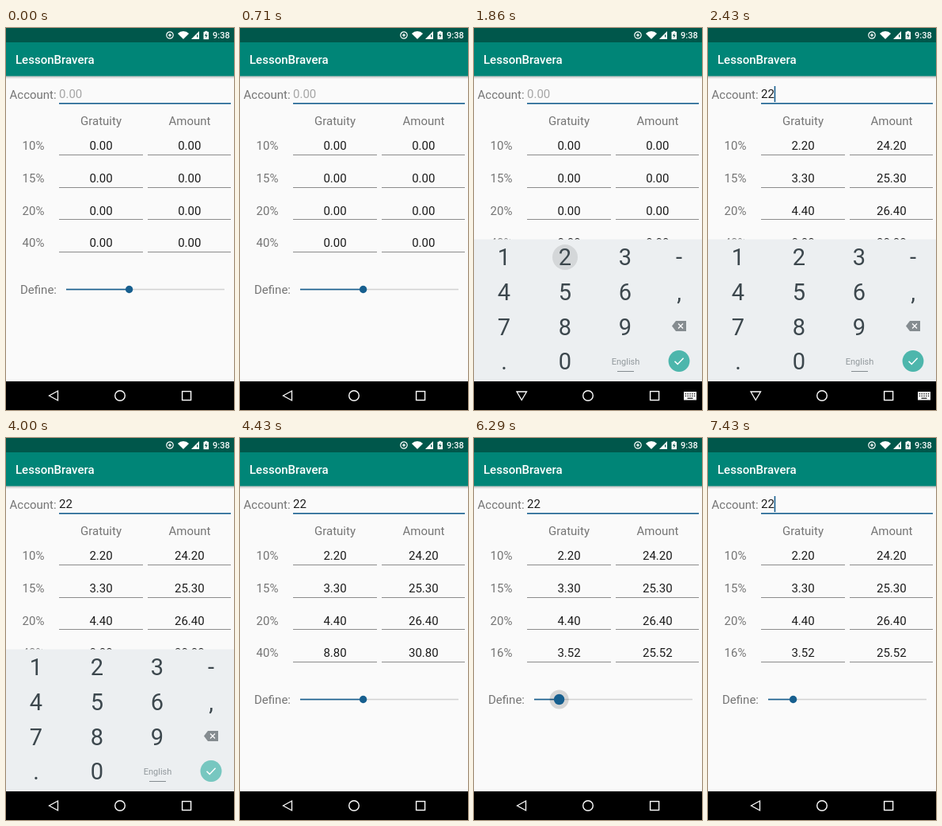
An HTML page with a canvas that plays this animation: 288 by 480 pixels, repeating every 7570 ms.

```html
<!DOCTYPE html>
<html lang="en">
<head>
<meta charset="utf-8">
<title>Tip calculator</title>
<style>
  html, body { margin: 0; width: 100%; height: 100%; overflow: hidden; background: #fafafa; }
  canvas { display: block; }
</style>
</head>
<body>
<canvas id="stage" width="288" height="480"></canvas>
<script>
const LOOP = 7570, TICKS = 53;
const ACCENT = '#175f8f', LABEL = '#757575', INK = '#1c1c1c', KEY = '#3c474d';
const screen = document.getElementById('stage').getContext('2d');
const layer = document.createElement('canvas');
layer.width = 288;
layer.height = 480;
const keys = layer.getContext('2d');

const clamp = v => Math.max(0, Math.min(1, v));
const ramp = (t, from, to) => clamp((t - from) / (to - from));
const within = (t, spans) => spans.some(([a, b]) => t >= a && t < b);

// Times are in ticks, seven per second.
const CARET = [[9, 13], [14, 21], [24, 28], [32, 35], [39, 42], [46, 49], [52, 53]];
const DRAG = [[33, 40], [37, 72], [39, 76], [41, 59], [44, 16]];

function percentAt(t) {
  if (t <= DRAG[0][0]) return DRAG[0][1];
  for (let i = 1; i < DRAG.length; i++) {
    const [a, from] = DRAG[i - 1], [b, to] = DRAG[i];
    if (t <= b) return Math.round(from + (to - from) * (t - a) / (b - a));
  }
  return DRAG[DRAG.length - 1][1];
}

function text(c, str, x, y, size, color, align = 'center', weight = 400) {
  c.font = `${weight} ${size}px Roboto, sans-serif`;
  c.textAlign = align;
  c.fillStyle = color;
  c.fillText(str, x, y);
}

function rect(c, x, y, w, h, color) {
  c.fillStyle = color;
  c.fillRect(x, y, w, h);
}

function disc(c, x, y, r, color) {
  c.fillStyle = color;
  c.beginPath();
  c.arc(x, y, r, 0, 7);
  c.fill();
}

function path(c, points, { fill, stroke, width = 1.3, closed = true }) {
  c.beginPath();
  points.forEach(([x, y]) => c.lineTo(x, y));
  if (closed) c.closePath();
  if (fill) { c.fillStyle = fill; c.fill(); }
  if (stroke) { c.strokeStyle = stroke; c.lineWidth = width; c.stroke(); }
}

function ring(c, x, y, r, width) {
  c.strokeStyle = '#fff';
  c.lineWidth = width;
  c.beginPath();
  c.arc(x, y, r, 0, 7);
  c.stroke();
}

function drawBars(c) {
  rect(c, 0, 0, 288, 18, '#00574b');
  rect(c, 0, 18, 288, 42.5, '#008577');
  const shadow = c.createLinearGradient(0, 60, 0, 64);
  shadow.addColorStop(0, 'rgba(0,0,0,.28)');
  shadow.addColorStop(1, 'rgba(0,0,0,0)');
  rect(c, 0, 60.5, 288, 4, shadow);
  text(c, 'LessonBravera', 12, 45.3, 15, '#fff', 'left', 500);

  ring(c, 207, 9, 4.2, 1.2);
  rect(c, 205, 8.4, 4, 1.2, '#fff');
  rect(c, 206.4, 7, 1.2, 4, '#fff');
  c.beginPath();
  c.moveTo(224, 14);
  c.arc(224, 14, 10, -Math.PI * 0.75, -Math.PI * 0.25);
  c.fillStyle = '#fff';
  c.fill();
  path(c, [[234, 14], [244, 14], [244, 4]], { fill: '#fff' });
  rect(c, 241, 8.5, 1.3, 3, '#00574b');
  rect(c, 249.5, 4.8, 6.5, 9.4, '#fff');
  rect(c, 251.3, 3.8, 3, 1.2, '#fff');
  path(c, [[253.4, 6], [251, 10], [252.6, 10], [252.2, 13], [254.6, 9], [253, 9]], { fill: '#00574b' });
  text(c, '9:38', 261, 13, 11, '#fff', 'left', 500);
}

function drawForm(c, t, entry) {
  const percent = percentAt(t), account = Number(entry);
  text(c, 'Account:', 4.5, 88.5, 15, LABEL, 'left');
  text(c, entry || '0.00', 67, 88, 15, entry ? INK : '#a6a6a6', 'left');
  rect(c, 67, 94, 217, 1.6, ACCENT);
  if (within(t, CARET)) {
    const end = entry ? c.measureText(entry).width : 0;
    rect(c, 66.8 + end, 73, 1.6, 20, ACCENT);
  }

  text(c, 'Gratuity', 120, 121.5, 15, LABEL);
  text(c, 'Amount', 232, 121.5, 15, LABEL);
  [10, 15, 20, percent].forEach((rate, i) => {
    const y = 153.4 + i * 40.6, tip = account * rate / 100;
    text(c, rate + '%', 34.5, y, 15, LABEL);
    text(c, tip.toFixed(2), 120, y, 15, INK);
    text(c, (account + tip).toFixed(2), 231.8, y, 15, INK);
    rect(c, 67, Math.round(y + 5.6), 106, 1, '#8c8c8c');
    rect(c, 179, Math.round(y + 5.6), 105, 1, '#8c8c8c');
  });

  const x = 75.6 + percent * 2, press = ramp(t, 31, 33) * (1 - ramp(t, 45, 50));
  text(c, 'Define:', 18, 334, 15, LABEL, 'left');
  rect(c, 76, 327.7, 200, 1.6, '#d3d3d3');
  rect(c, 76, 327.7, x - 76, 1.6, ACCENT);
  disc(c, x, 328.5, 12, `rgba(0,0,0,${0.14 * press})`);
  disc(c, x, 328.5, 4.7 + 2 * press, ACCENT);
}

function drawKeyboard(c, t) {
  c.clearRect(0, 0, 288, 480);
  rect(c, 0, 265.5, 288, 178.5, '#eceff1');
  c.save();
  c.beginPath();
  c.rect(0, 265.5, 288, 178.5);
  c.clip();
  if (t >= 13 && t < 17) {
    disc(c, 115, 288, 48 * ramp(t, 12, 15), `rgba(0,0,0,${0.1 * (1 - ramp(t, 15, 17))})`);
  }
  c.restore();

  ['123-', '456,', '789', '.0'].forEach((row, r) => {
    [...row].forEach((ch, i) => text(c, ch, [38, 115, 191, 259][i], 298 + r * 43.8, 29, KEY));
  });

  path(c, [[250, 374.5], [255, 368], [268, 368], [268, 381], [255, 381]], { fill: '#858c90' });
  path(c, [[258, 371.5], [264, 377.5]], { stroke: '#fff', closed: false });
  path(c, [[264, 371.5], [258, 377.5]], { stroke: '#fff', closed: false });
  text(c, 'English', 191.5, 422.5, 11, '#92999d');
  rect(c, 181, 431, 21, 1, '#858c90');
  disc(c, 259, 418.5, 13.4, '#4db6ac');
  disc(c, 259, 418.5, 13.4, `rgba(255,255,255,${0.24 * ramp(t, 24, 28)})`);
  path(c, [[253.5, 418.7], [257.2, 422.4], [264.6, 414.8]], { stroke: '#fff', width: 1.5, closed: false });
}

function drawNavIcons(c, typing) {
  const back = typing
    ? [[54, 457], [66.5, 457], [60.2, 467.5]]
    : [[54.5, 462], [65.5, 456], [65.5, 468]];
  path(c, back, { stroke: '#fff' });
  ring(c, 144, 462, 6.3, 1.4);
  c.strokeRect(222.6, 456.6, 11, 11);
  if (!typing) return;
  rect(c, 265, 457, 16, 10.5, '#fff');
  for (let i = 0; i < 10; i++) {
    rect(c, 266.7 + (i % 5) * 2.8, 459 + Math.floor(i / 5) * 2.7, 1.4, 1.4, '#222');
  }
  rect(c, 269.5, 464.6, 7, 1.3, '#222');
}

function draw(t) {
  const c = screen, closing = t >= 24;
  const entry = t < 14 ? '' : t < 16 ? '2' : '22';
  const shown = closing ? 1 - ramp(t, 28, 30.5) : ramp(t, 9, 11.3);
  const navBar = () => rect(c, 0, 444, 288, 36, '#000');

  rect(c, 0, 0, 288, 480, '#fafafa');
  drawForm(c, t, entry);
  drawBars(c);
  if (!closing) navBar();
  if (shown > 0) {
    drawKeyboard(keys, t);
    c.globalAlpha = shown;
    c.drawImage(layer, 0, Math.round(81 * (1 - shown)));
    c.globalAlpha = 1;
  }
  if (closing) navBar();
  drawNavIcons(c, t >= 9 && t < 28);
}

function play(now) {
  draw(Math.floor(now % LOOP / LOOP * TICKS + 0.03));
  requestAnimationFrame(play);
}
requestAnimationFrame(play);
</script>
</body>
</html>
```
